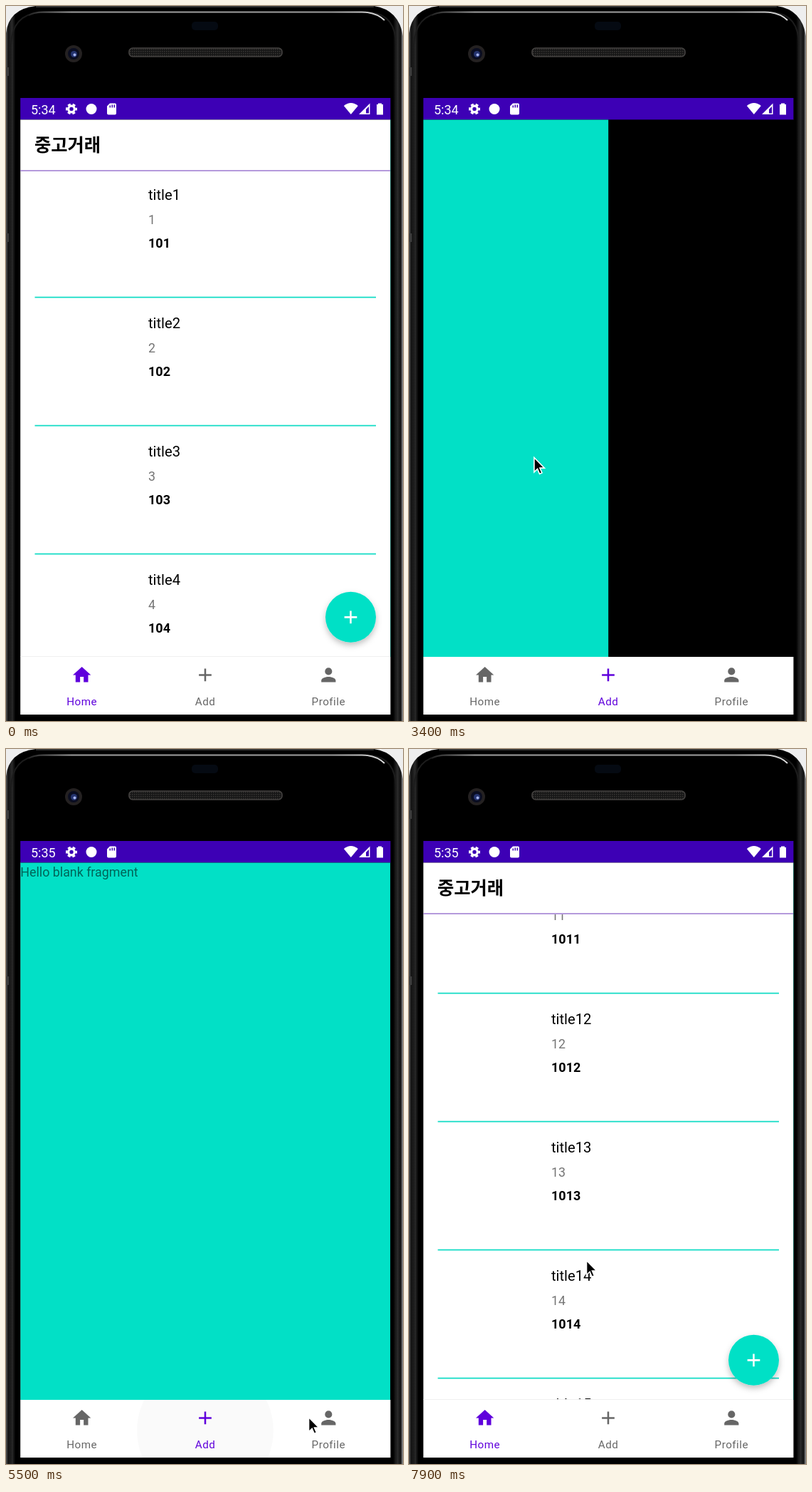
An HTML page for the animation above (8 s loop, 558 by 1003 pixels).

```html
<!DOCTYPE html>
<html lang="ko">
<head>
<meta charset="utf-8">
<style>
  html, body { margin: 0; width: 100%; height: 100%; overflow: hidden; background: #eee; }
  svg { display: block; width: 558px; height: 1003px; font-family: Roboto, sans-serif; }
  .title { font-size: 20.2px; }
  .note { font-size: 17.8px; fill: #757575; }
  .price { font-size: 18px; font-weight: 700; }
  .heading { font: 700 25.3px "Noto Sans CJK KR", "Noto Sans CJK", sans-serif; }
  .tab { fill: #666; text-anchor: middle; font-size: 15.2px; letter-spacing: .5px; }
  .tab.on { fill: #5f00dc; }
</style>
</head>
<body>
<svg viewBox="0 0 558 1003">
  <defs>
    <linearGradient id="side">
      <stop offset="0" stop-color="#555"/><stop offset=".006" stop-color="#111"/>
      <stop offset=".015" stop-color="#2b2b2b"/><stop offset=".024" stop-color="#000"/>
      <stop offset=".975" stop-color="#000"/><stop offset=".986" stop-color="#2b2b2b"/>
      <stop offset=".994" stop-color="#111"/><stop offset="1" stop-color="#999"/>
    </linearGradient>
    <linearGradient id="rim">
      <stop offset="0" stop-color="#222"/><stop offset=".12" stop-color="#999"/>
      <stop offset=".85" stop-color="#999"/><stop offset="1" stop-color="#ddd"/>
    </linearGradient>
    <pattern id="mesh" width="3" height="3" patternUnits="userSpaceOnUse">
      <rect width="3" height="3" fill="#161616"/><rect width="1.5" height="1.5" fill="#393735"/>
    </pattern>
    <filter id="shadow" x="-30%" y="-30%" width="160%" height="170%">
      <feDropShadow dx="0" dy="4" stdDeviation="4" flood-opacity=".25"/>
    </filter>
    <clipPath id="content"><rect x="20.2" y="159.4" width="520.2" height="753.6"/></clipPath>
    <clipPath id="listArea"><rect x="20" y="232" width="521" height="681"/></clipPath>
    <clipPath id="navArea"><rect x="20.2" y="913" width="520.2" height="81"/></clipPath>
    <path id="plus" d="M19 13h-6v6h-2v-6H5v-2h6V5h2v6h6z"/>
  </defs>

  <!-- phone body -->
  <path d="M0 1003V38Q4 4 42 0H517Q552 5 558 42V1003z" fill="url(#side)"/>
  <path d="M7 1003V55Q8 12 48 9H512Q548 12 548 55V1003" fill="none" stroke="#1c1c1c" stroke-width="2"/>
  <path d="M32 13Q40 8.500 52 8.500H500Q520 8.500 532 20" fill="none" stroke="url(#rim)" stroke-width="2"/>
  <path d="M42 1H517" stroke="#333" stroke-width="2"/>
  <path d="M0 86h4v12H0zM0 319h4v12H0z" fill="#3c3c3c"/>
  <rect x="261" y="22" width="37" height="12" rx="5" fill="#050a12"/>
  <rect x="173" y="59" width="215" height="12" rx="5" fill="url(#mesh)" stroke="#454341" stroke-width="1.6"/>
  <circle cx="95" cy="67" r="12" fill="#242121"/>
  <circle cx="95" cy="67" r="8" fill="#0a0d20"/>
  <circle cx="95.500" cy="67.500" r="4.500" fill="#25346f"/>
  <circle cx="96.500" cy="68.500" r="2" fill="#a5b4ee"/>

  <!-- status bar -->
  <rect x="20.200" y="129" width="520.200" height="31" fill="#3d00b5"/>
  <g fill="#fff">
    <text id="clock" x="35" y="151.600" font-size="18"></text>
    <g fill="none" stroke="#fff" transform="translate(92 144.500)">
      <circle r="4.300" stroke-width="3.200"/>
      <circle r="6.700" stroke-width="2.600" stroke-dasharray="4 3.020" stroke-dashoffset="2"/>
    </g>
    <circle cx="120" cy="144.500" r="7.500"/>
    <path fill-rule="evenodd" d="M146 136.500h7q2 0 2 2v12q0 2-2 2h-9q-2 0-2-2v-10zM145.500 139.500v3h1.500v-3zm3-1v4h1.500v-4zm3 0v4h1.500v-4z"/>
    <path d="M474.800 140q10-8 20 0l-10 12z"/>
    <path fill-rule="evenodd" d="M511.500 136.500V152H496zM510 141l-4 4v5.500h4z"/>
    <path d="M523 136.500h5v1.500h2v14.500h-9V138h2z"/>
  </g>

  <!-- pages -->
  <rect x="20.200" y="159.400" width="520.200" height="753.600"/>
  <g clip-path="url(#content)">
    <g id="pager">
      <rect x="20" y="159" width="520.400" height="754" fill="#fff"/>
      <text class="heading" x="40" y="204">중고거래</text>
      <g clip-path="url(#listArea)"><g id="list"></g></g>
      <path d="M20 231H540" stroke="#9c78d0" stroke-width="1.500"/>
      <circle cx="484.500" cy="857.300" r="35.500" fill="#02e0c6" filter="url(#shadow)"/>
      <use href="#plus" fill="#fff" transform="translate(469.300 842.200) scale(1.2645)"/>
      <path d="M20 912.500H540" stroke="#f0f0f0"/>
      <rect x="540.200" y="159" width="520" height="754" fill="#02e0c6"/>
      <text x="540.300" y="179" font-size="17.850" fill-opacity=".55">Hello blank fragment</text>
    </g>
  </g>

  <!-- bottom navigation -->
  <rect x="20.200" y="913" width="520.200" height="81" fill="#fff"/>
  <g id="ripples" clip-path="url(#navArea)"></g>
  <g id="tabs"></g>

  <path id="cursor" d="M0 0V17.500l4-3.800 2.600 6 2.900-1.200-2.600-5.900h5.600z" stroke="#fff" stroke-width="1.400"/>
</svg>
<script>
const $ = id => document.getElementById(id);
const LOOP = 8000, STEP = 100, PAGE = 520, PITCH = 180;
const SWIPE = 600, TAP = 311, FADE = 540;

const swipe = (start, to) => ({ start, to, time: SWIPE, selectAt: start + SWIPE / 2 });
const tap = (start, to, x) => ({ start, to, x, time: TAP, selectAt: start });
const moves = [swipe(1303, 1), swipe(2158, 2), swipe(3100, 1), swipe(3817, 0),
  tap(5000, 1, 282), tap(5700, 2, 450), tap(6200, 0, 126)];
const flings = [6900, 7400];

// Pointer stops: time, x, y
const stops = [[100, 500, 8], [400, 65, 910], [700, 65, 910], [1200, 383, 590], [1400, 383, 590],
  [1800, 214, 593], [2200, 390, 615], [2600, 120, 626], [3100, 120, 626], [3800, 262, 645],
  [4100, 500, 645], [4900, 280, 950], [5500, 425.5, 937.5], [6200, 124, 952], [6300, 124, 952],
  [6900, 250, 780], [7900, 249.5, 717.5]];

const clamp = x => Math.min(1, Math.max(0, x));
const smooth = x => (x = clamp(x), x * x * (3 - 2 * x));
const tabX = i => 20 + PAGE * (i + .5) / 3;

function pageAt(t) {
  return moves.reduce((page, m) => page + (m.to - page) * smooth((t - m.start) / m.time), 0);
}

function scrollAt(t) {
  return flings.reduce((sum, start) => sum + 933 * smooth((t - start) / 500), 0);
}

function pointerAt(t) {
  const i = Math.max(1, stops.findIndex(s => s[0] >= t));
  const [t0, x0, y0] = stops[i - 1], [t1, x1, y1] = stops[i];
  const f = smooth((t - t0) / (t1 - t0));
  return [x0 + (x1 - x0) * f, y0 + (y1 - y0) * f];
}

function ripple({ start, to, x }, t) {
  const age = t - start;
  if (!x || age < 0 || age > FADE) return '';
  const cx = x + (tabX(to) - x) * clamp(age / 225);
  const r = 96 * Math.sqrt(clamp(age / 203));
  return `<circle cx="${cx}" cy="956" r="${r}" fill-opacity="${.16 * clamp((FADE - age) / 315)}"/>`;
}

$('list').innerHTML = Array.from({ length: 20 }, (_, i) => `<g transform="translate(0 ${i * PITCH})">
  <text class="title" x="200" y="272">title${i + 1}</text>
  <text class="note" x="200" y="305.5">${i + 1}</text>
  <text class="price" x="200" y="338.5">10${i + 1}</text>
  <path d="M40.5 408.7H520" stroke="#12dcc5" stroke-width="1.8"/></g>`).join('');

const icons = {
  Home: '<path d="M10 20v-6h4v6h5v-8h3L12 3 2 12h3v8z"/>',
  Add: '<use href="#plus"/>',
  Profile: '<path d="M12 12a4 4 0 1 0 0-8 4 4 0 0 0 0 8zm0 2c-2.67 0-8 1.34-8 4v2h16v-2c0-2.66-5.33-4-8-4z"/>'
};
$('tabs').innerHTML = Object.entries(icons).map(([name, icon], i) => `<g class="tab">
  <g transform="translate(${tabX(i) - 15.2} 923.3) scale(1.2645)">${icon}</g>
  <text x="${tabX(i)}" y="981">${name}</text></g>`).join('');
const tabs = [...$('tabs').children];

function draw(now) {
  const t = Math.floor(now % LOOP / STEP) * STEP;
  const [x, y] = pointerAt(t);
  const selected = moves.findLast(m => m.selectAt <= t)?.to ?? 0;
  $('pager').setAttribute('transform', `translate(${-pageAt(t) * PAGE} 0)`);
  $('list').setAttribute('transform', `translate(0 ${-scrollAt(t)})`);
  $('cursor').setAttribute('transform', `translate(${x} ${y}) scale(1.16)`);
  $('cursor').setAttribute('visibility', t < 100 ? 'hidden' : 'visible');
  $('clock').textContent = t < 4500 ? '5:34' : '5:35';
  $('ripples').innerHTML = moves.map(m => ripple(m, t)).join('');
  tabs.forEach((tab, i) => tab.classList.toggle('on', i === selected));
}

const origin = performance.now();
(function frame() {
  draw(performance.now() - origin);
  requestAnimationFrame(frame);
})();
</script>
</body>
</html>
```
